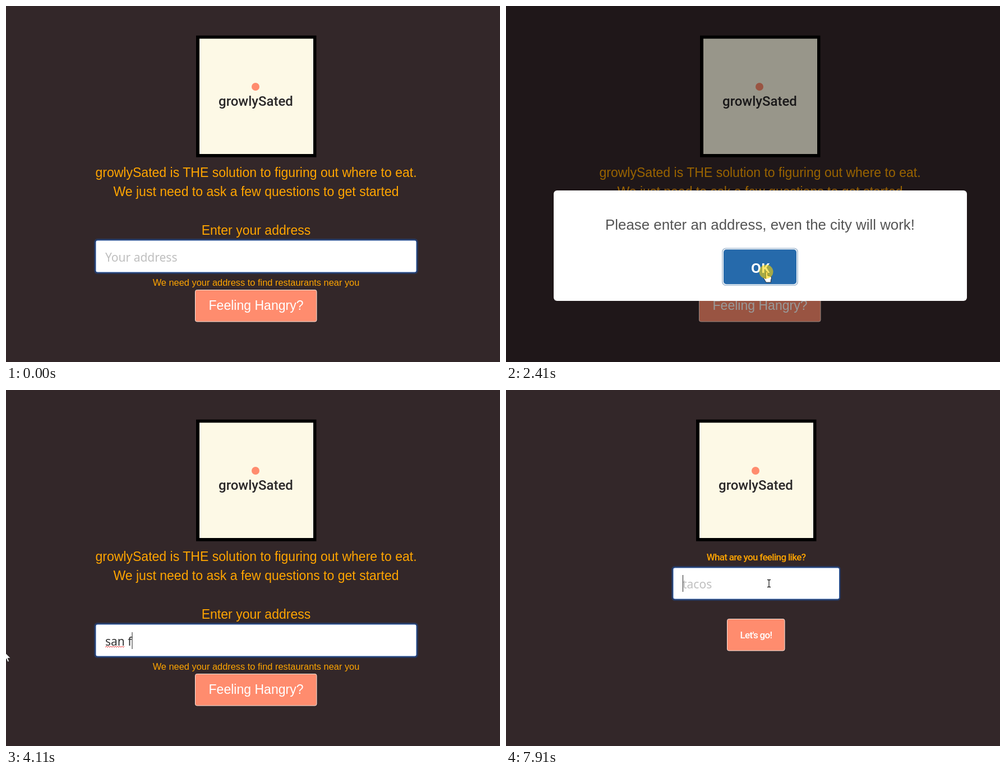
These frames come from a looping animation (881 px wide and 635 px high, 7.99 s). An HTML page:

```html
<!DOCTYPE html>
<html lang="en">
<head>
<meta charset="utf-8">
<title>growlySated</title>
<style>
  html, body { margin: 0; width: 100%; height: 100%; overflow: hidden; background: #332729; }
  svg { display: block; width: 881px; height: 635px; }
  text { font: 23.04px "Liberation Sans", Arial, sans-serif; fill: #ffa500; }
  .mid { text-anchor: middle; }
  .hint { font-size: 16.4px; }
  .field text { font: 21px "Noto Sans", "Open Sans", sans-serif; fill: #333; }
  .field .placeholder { fill: #bfbfbf; }
  .field .glow { fill: #28385c; }
  .field .box { fill: #fff; stroke: #3163b2; }
  .caret { fill: #222; }
  .btn rect { fill: #ff8c6e; stroke: #f8e4dc; }
  .btn text { fill: #fff; }
  .btn.hover rect { stroke: #343a40; }
  .btn.hover text { fill: #343a40; }
  .narrow { font: 500 17px Roboto, sans-serif; letter-spacing: -.04em; }
  .brand { font: 500 24px Roboto, sans-serif; fill: #2a2829; }
  #modal .message { font-size: 25.86px; fill: #545454; }
  #modal .ok { font: 600 23px "Noto Sans", sans-serif; fill: #fff; }
</style>
</head>
<body>
<svg viewBox="0 0 881 635">
  <rect width="881" height="635" fill="#332729"/>

  <g id="page">
    <rect x="339" y="52.7" width="214.5" height="217"/>
    <rect x="345" y="58.3" width="203" height="205.7" fill="#fdf9e6"/>
    <circle cx="445" cy="144" r="7" fill="#ff8c6e"/>
    <text class="mid brand" x="445.5" y="178">growlySated</text>

    <g id="addressForm">
      <text class="mid" x="446" y="305">growlySated is THE solution to figuring out where to eat.</text>
      <text class="mid" x="446" y="339">We just need to ask a few questions to get started</text>
      <text class="mid" x="446" y="408">Enter your address</text>
      <g class="field">
        <rect class="glow" x="157" y="415" width="578" height="63" rx="6"/>
        <rect class="box" x="160" y="418" width="572" height="57" rx="3"/>
        <text class="placeholder" id="addressHint" x="177" y="456">Your address</text>
        <text id="typed" x="177" y="456"></text>
        <path id="squiggle" fill="none" stroke="#e53030"/>
        <rect class="caret" id="addressCaret" y="432" width="1" height="30"/>
      </g>
      <text class="mid hint" x="446" y="499">We need your address to find restaurants near you</text>
      <g class="btn" id="hangryButton">
        <rect x="337.5" y="506.5" width="216.5" height="56.5" rx="3"/>
        <text class="mid" x="446" y="542">Feeling Hangry?</text>
      </g>
    </g>

    <g id="cravingForm">
      <text class="mid narrow" x="446" y="304">What are you feeling like?</text>
      <g class="field">
        <rect class="glow" x="295" y="314" width="302" height="62" rx="6"/>
        <rect class="box" x="298" y="317" width="296.5" height="56" rx="3"/>
        <text class="placeholder" x="315" y="354">tacos</text>
        <rect class="caret" id="cravingCaret" x="315" y="330" width="1" height="30"/>
      </g>
      <g class="btn">
        <rect x="394.5" y="408.5" width="102.5" height="56.5" rx="3"/>
        <text class="mid narrow" x="446" y="442.5">Let's go!</text>
      </g>
    </g>
  </g>

  <rect id="shade" width="881" height="635"/>
  <g id="modal">
    <rect x="85" y="329" width="737" height="197" rx="6" fill="#fff"/>
    <text class="mid message" x="453" y="399">Please enter an address, even the city will work!</text>
    <rect x="385" y="431.5" width="136" height="67.5" rx="7" fill="#adc1d5"/>
    <rect x="386.7" y="433" width="132.6" height="64.5" rx="6" fill="#fff"/>
    <rect id="okButton" x="388" y="434.3" width="130" height="62" rx="5"/>
    <text class="mid ok" x="453.5" y="476">OK</text>
  </g>

  <g id="cursor" stroke-linejoin="round">
    <path id="arrow" d="M0 0V15.5L3.6 12.2 6 18 8.6 17 6.2 11.3H11Z" fill="#fff" stroke="#222" stroke-width=".8"/>
    <path id="hand" d="M-.5 1.5a1.5 1.5 0 0 1 3 0V7l5 1.2q2 .6 2 2.8l-1.2 5V19H-.2L-4 12.5q-1-2 1-2l2.5 2Z"
          fill="#fff" stroke="#222" stroke-width=".9"/>
    <path id="beam" d="M-3-6.5H-1L0-5.5 1-6.5H3M0-5.5V5.5M-3 6.5H-1L0 5.5 1 6.5H3" fill="none" stroke="#222" stroke-width="1.3"/>
    <circle id="halo" r="12.5" fill="#ffd800" opacity=".58"/>
  </g>
</svg>

<script>
const LOOP = 7990, TICK = 77.6;
const ENTER = 70, MODAL_OPEN = 1170, MODAL_CLOSING = 2440, MODAL_CLOSED = 2560, NEXT_PAGE = 7060;
const WORDS = "san francisco", TYPE_START = 3570, TYPE_END = 5660;

const START = { x: 717, y: 596 };
const GLIDES = [
  { from: ENTER, to: 770, x: 498, y: 524 },
  { from: MODAL_OPEN, to: 1320, x: 504, y: 525 },
  { from: 1600, to: 2000, x: 464, y: 474 },
  { from: 2950, to: 3260, x: -3, y: 467 },
  { from: 6280, to: 6830, x: 442, y: 532 },
  { from: 6980, to: 7830, x: 469, y: 345 }
];

const $ = id => document.getElementById(id);
const show = (id, on) => $(id).style.display = on ? "" : "none";
const within = (t, from, to) => t >= from && t < to;
const inside = (p, left, top, right, bottom) => p.x >= left && p.x <= right && p.y >= top && p.y <= bottom;
const progress = (t, from, to) => Math.min(1, Math.max(0, (t - from) / (to - from)));
const smooth = p => p * p * (3 - 2 * p);

function pointerAt(t) {
  return GLIDES.reduce((pos, glide) => {
    const p = smooth(progress(t, glide.from, glide.to));
    return { x: pos.x + (glide.x - pos.x) * p, y: pos.y + (glide.y - pos.y) * p };
  }, START);
}

// The typist slows down towards the end.
function typedCount(t) {
  if (t < TYPE_START) return 0;
  return 1 + Math.floor((WORDS.length - 1) * progress(t, TYPE_START, TYPE_END) ** (1 / 1.4));
}

// A damped spring on opening, a quick shrink on closing.
function modalScale(t) {
  const age = t - 1110;
  const spring = .3 * Math.exp(-age / 88) * Math.cos(Math.PI * age / 100);
  return 1 - spring - .5 * progress(t, MODAL_CLOSING, MODAL_CLOSED);
}

function drawForms(t, pos, modal) {
  const next = t >= NEXT_PAGE;
  show("addressForm", !next);
  show("cravingForm", next);
  $("page").setAttribute("transform", `translate(${modal ? 7 : 0})`);

  const count = typedCount(t);
  $("typed").textContent = WORDS.slice(0, count).replace(/ $/, "\u00a0");
  show("addressHint", !count);
  show("squiggle", count > 3);
  show("addressCaret", within(t, 3420, 6210) || within(t, 6740, NEXT_PAGE));
  if (!next) $("addressCaret").setAttribute("x", 177 + (count ? $("typed").getComputedTextLength() : 0));
  show("cravingCaret", t >= 7600);

  const hover = !next && !modal && t >= ENTER && inside(pos, 337, 506, 554, 563);
  $("hangryButton").classList.toggle("hover", hover);
  return hover;
}

function drawModal(t, pos, modal, pressed) {
  show("shade", modal);
  show("modal", modal);
  const opacity = 1 - progress(t, MODAL_CLOSING, MODAL_CLOSED);
  $("modal").setAttribute("transform", `translate(453.5 427.5) scale(${modalScale(t)}) translate(-453.5 -427.5)`);
  $("modal").setAttribute("opacity", opacity);
  $("shade").setAttribute("opacity", .4 * opacity);
  const hover = modal && inside(pos, 388, 434, 518, 496);
  $("okButton").setAttribute("fill", !hover ? "#3085d6" : pressed ? "#266aab" : "#2b78c1");
  return hover;
}

function draw(t) {
  const held = Math.floor((t + 10) / TICK) * TICK;
  const pos = pointerAt(held);
  const modal = within(t, MODAL_OPEN, MODAL_CLOSED);
  const pressed = within(t, 1080, MODAL_OPEN) || within(t, 2330, 2480) || within(t, 6910, NEXT_PAGE);
  const overPage = drawForms(t, pos, modal);
  const overOk = drawModal(held, pos, modal, pressed);

  const overField = !modal && (t < NEXT_PAGE
    ? inside(pos, 160, 418, 732, 475) : inside(pos, 298, 317, 594, 373));
  const hand = overPage || overOk;
  show("cursor", t >= ENTER);
  show("hand", hand);
  show("beam", overField);
  show("arrow", !hand && !overField);
  show("halo", pressed);
  $("cursor").setAttribute("transform", `translate(${pos.x} ${pos.y})`);
}

$("squiggle").setAttribute("d", "M177 459" + "l2-2 2 2".repeat(8) + "l2-2");

function frame(now) {
  draw(now % LOOP);
  requestAnimationFrame(frame);
}
requestAnimationFrame(frame);
</script>
</body>
</html>
```
